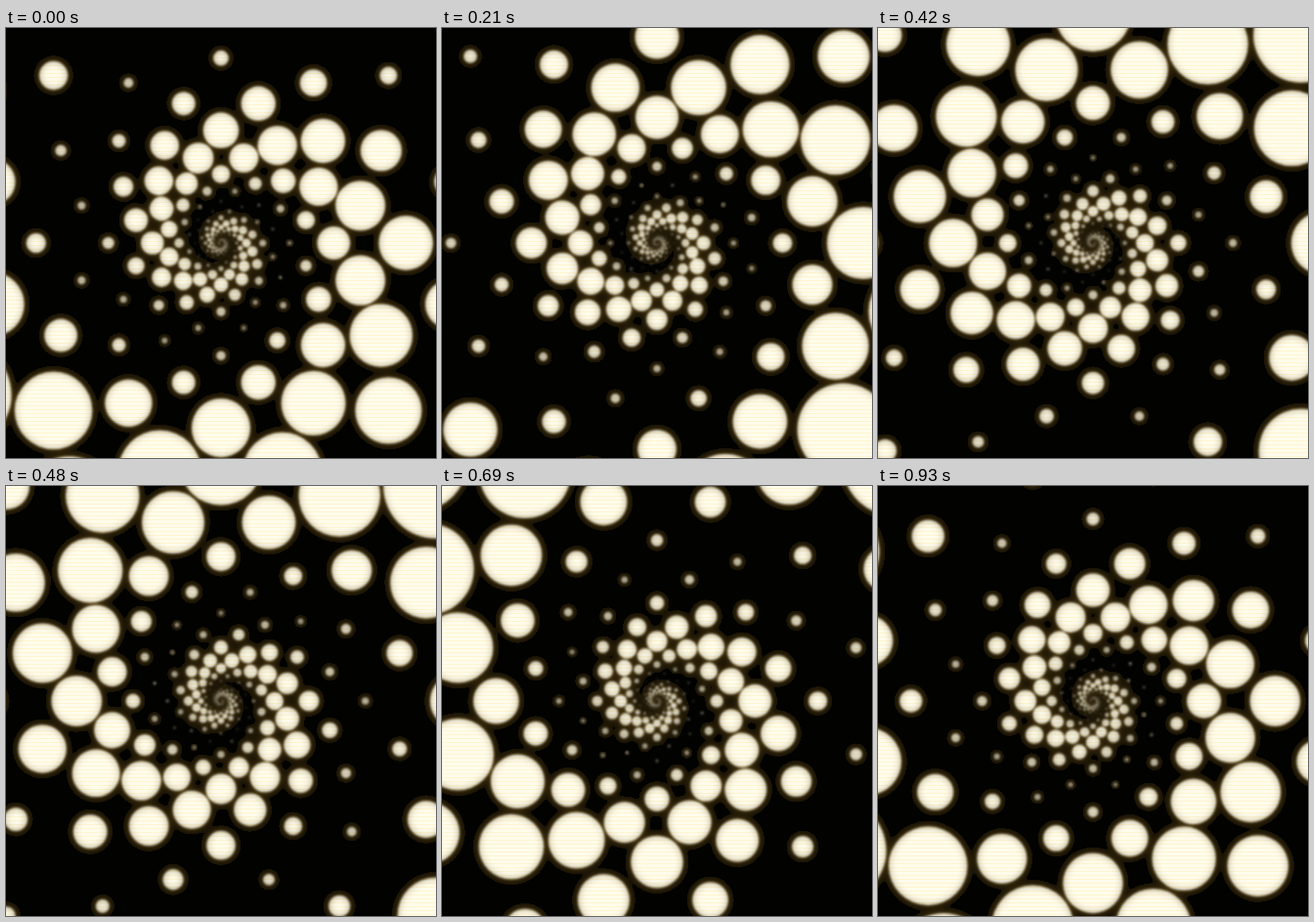
An HTML page with a canvas that plays this animation: 440x440 px, repeating every 0.96 s.

```html
<!DOCTYPE html>
<html>
<head>
<meta charset="utf-8">
<style>
  html, body { margin: 0; height: 100%; overflow: hidden; background: #020200; }
  canvas { display: block; }
</style>
</head>
<body>
<canvas id="stage" width="440" height="440"></canvas>
<script>
const SIZE = 440, CENTER = 220, LOOP = 960, STEP = 30;
const DOTS = 12, RATIO = 1.281, TAU = Math.PI * 2;
const ctx = document.getElementById('stage').getContext('2d');
const image = ctx.createImageData(SIZE, SIZE);

function makeLayer() {
  const layer = document.createElement('canvas');
  layer.width = layer.height = SIZE;
  return layer.getContext('2d', { willReadFrequently: true });
}
const sharpLayer = makeLayer(), glowLayer = makeLayer();

// Rings move outward by two steps per loop while the size wave turns once.
function dotField(phase) {
  const path = new Path2D();
  for (let ring = -20; ring <= 4; ring++) {
    const radius = 189.2 * RATIO ** (ring + 2 * phase);
    const peak = TAU * (0.25 + (ring + 1 + 2 * phase) / 7 - phase);
    for (let i = 0; i < DOTS; i++) {
      const angle = TAU * (i + (ring & 1) / 2) / DOTS;
      const size = radius * (0.101 + 0.075 * Math.cos(angle - peak));
      const x = CENTER + radius * Math.sin(angle);
      const y = CENTER - radius * Math.cos(angle);
      path.moveTo(x + size, y);
      path.arc(x, y, size, 0, TAU);
    }
  }
  return path;
}

function rasterize(layer, path, blur) {
  layer.filter = 'none';
  layer.fillStyle = '#000';
  layer.fillRect(0, 0, SIZE, SIZE);
  layer.filter = `blur(${blur}px)`;
  layer.fillStyle = '#fff';
  layer.fill(path);
  return layer.getImageData(0, 0, SIZE, SIZE).data;
}

// Cream dots shaded by their own glow, a brown halo and faint scan lines.
function draw(phase) {
  const path = dotField(phase);
  const sharp = rasterize(sharpLayer, path, 0.9);
  const glow = rasterize(glowLayer, path, 4.5);
  const out = image.data;
  for (let p = 0; p < out.length; p += 4) {
    const wide = glow[p] / 255;
    const lit = sharp[p] / 255 * wide ** 0.4;
    const halo = wide > 0.08 ? (1 - lit) * (0.6 + 2.5 * wide) : 0;
    const line = (p / 4 / SIZE | 0) % 4 === 2;
    out[p] = 2 + 253 * lit + 30 * halo;
    out[p + 1] = 2 + (line ? 243 : 250) * lit + 22 * halo;
    out[p + 2] = (line ? 205 : 236) * lit + 6 * halo;
    out[p + 3] = 255;
  }
  ctx.putImageData(image, 0, 0);
}

let shown = -1;
function tick() {
  const step = Math.floor(performance.now() % LOOP / STEP);
  if (step !== shown) draw(step * STEP / LOOP);
  shown = step;
  requestAnimationFrame(tick);
}
tick();
</script>
</body>
</html>
```
